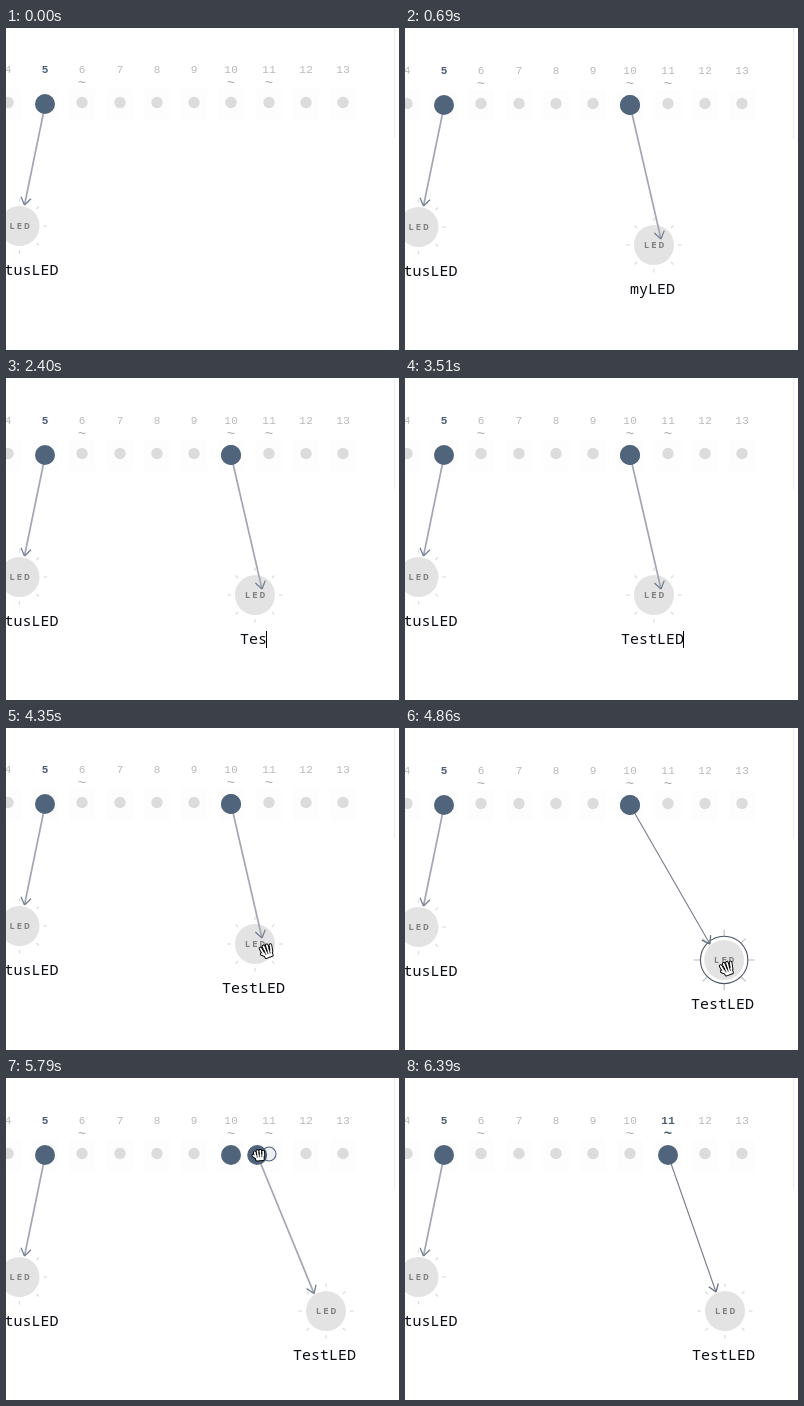
These frames come from a looping animation (393 px wide and 322 px high, 7390 ms). An HTML page with a canvas:

```html
<!DOCTYPE html>
<html lang="en">
<head>
<meta charset="utf-8">
<title>Rewiring an LED</title>
<style>
html, body { margin: 0; width: 100%; height: 100%; overflow: hidden; background: #fff; }
canvas { display: block; width: 393px; height: 322px; }
</style>
</head>
<body>
<canvas id="stage"></canvas>
<script>
const W = 393, H = 322, LOOP = 7390;
const NAVY = '#50647b';
const MONO = '"Noto Sans Mono", "DejaVu Sans Mono", monospace';
const PIN_FONT = '"Liberation Mono", monospace';
const LABEL_FONT = '500 15px ' + MONO;
const LABEL_COLOR = '#0a0d16';
const keyTimes = [1410, 1950, 2400, 2520, 2940, 3060, 3330];

const canvas = document.getElementById('stage');
const ratio = window.devicePixelRatio || 1;
canvas.width = Math.round(W * ratio);
canvas.height = Math.round(H * ratio);
const ctx = canvas.getContext('2d');

const pinX = n => Math.round(39 + (n - 5) * 37.25);
const mix = (a, b, k) => a + (b - a) * k;
const span = (t, from, to) => Math.max(0, Math.min(1, (t - from) / (to - from)));
const ease = (t, from, to) => {
  const k = span(t, from, to);
  return k * k * (3 - 2 * k);
};

function text(str, x, y, font, color, spacing = 0) {
  ctx.font = font;
  ctx.fillStyle = color;
  ctx.letterSpacing = spacing + 'px';
  ctx.textAlign = 'center';
  ctx.fillText(str, x + spacing / 2, y);
}

function disc(x, y, r, fill, stroke) {
  ctx.beginPath();
  ctx.arc(x, y, r, 0, Math.PI * 2);
  ctx.fillStyle = fill;
  ctx.fill();
  if (stroke) {
    ctx.strokeStyle = stroke;
    ctx.lineWidth = 1.1;
    ctx.stroke();
  }
}

function line(x1, y1, x2, y2, color, width) {
  ctx.strokeStyle = color;
  ctx.lineWidth = width;
  ctx.beginPath();
  ctx.moveTo(x1, y1);
  ctx.lineTo(x2, y2);
  ctx.stroke();
}

function pin(n, used) {
  const x = pinX(n);
  const color = used ? '#4a5e76' : '#b9b9b9';
  const weight = used ? 'bold ' : '';
  ctx.fillStyle = '#fdfdfd';
  ctx.fillRect(x - 13, 62, 26, 31);
  text(n, x, 46, weight + '11px ' + PIN_FONT, color, 0.5);
  if (n === 6 || n === 10 || n === 11) {
    text('~', x, 60, weight + '14px ' + PIN_FONT, used ? color : '#a9a9a9');
  }
  if (!used) disc(x, 75.5, 5.7, '#dcdcdc');
}

const plug = x => disc(x, 77, 10, NAVY);

function wire(x, tx, ty, active) {
  const a = Math.atan2(ty - 77, tx - x);
  line(x, 77, tx, ty, active ? '#747c8a' : '#a3a7b3', active ? 1.1 : 1.7);
  for (const s of [-0.6, 0.6]) {
    line(tx, ty, tx - 9 * Math.cos(a + s), ty - 9 * Math.sin(a + s),
      active ? '#66707f' : '#747e90', 1.3);
  }
}

function led(x, y, active) {
  for (let i = 0; i < 8; i++) {
    const c = Math.cos(i * Math.PI / 4), s = Math.sin(i * Math.PI / 4);
    const far = active ? 30.5 : 27.5;
    line(x + c * 24, y + s * 24, x + c * far, y + s * far, active ? '#c6c7ca' : '#dedede', 1.3);
  }
  if (active) disc(x, y, 23.7, '#fff', '#4c5464');
  disc(x, y, 20, '#e3e3e3');
  text('LED', x, y + 3, 'bold 9px ' + MONO, '#808080', 2);
}

function hand(x, y, closed) {
  ctx.save();
  ctx.translate(x, y);
  ctx.rotate(closed ? -0.1 : -0.35);
  ctx.lineCap = ctx.lineJoin = 'round';
  const reach = closed ? 3.5 : 6;
  const fan = closed ? 0.1 : 0.8;
  // Black pass first, then a thinner white pass leaves the outline.
  for (const [color, width] of [['#000', 3.6], ['#fff', 1.7]]) {
    for (let i = 0; i < 4; i++) {
      const fx = (i - 1.5) * 2.7;
      line(fx + (i - 1.5) * fan, Math.abs(i - 1.5) - reach, fx, 2, color, width);
    }
    line(-6, 1, -2, 4.5, color, width);
    ctx.fillStyle = color;
    ctx.beginPath();
    ctx.rect(-2.8, 1.5, 6, 4);
    ctx.fill();
    ctx.stroke();
  }
  for (let i = -1; i <= 1; i++) line(i * 2.6, -1.5, i * 2.3, 3, '#000', 0.7);
  ctx.restore();
}

function label(x, y, t) {
  const typed = keyTimes.filter(k => t >= k).length;
  const name = typed ? 'TestLED'.slice(0, typed) : 'myLED';
  const half = name.length * 4.5;
  if (!typed && t >= 780) {
    ctx.fillStyle = '#b6d0f7';
    ctx.fillRect(Math.round(x - half), y - 13, half * 2, 17);
  }
  text(name, x, y, LABEL_FONT, LABEL_COLOR);
  if (typed && t - keyTimes[typed - 1] < 500) {
    ctx.fillStyle = '#000';
    ctx.fillRect(Math.floor(x + half - 0.6), y - 13, 1, 17);
  }
}

function draw(t) {
  const raised = t < 600 || (t >= 4110 && t < 4500);
  const moving = t >= 5640 && t < 5880;
  const dropped = t >= 5880;
  const lifted = t >= 4400 && t < 4980;

  const drag = ease(t, 4440, 4890);
  const rewire = ease(t, 5640, 5880);
  const ledX = mix(249, 320, drag);
  const ledY = mix(217, 233, span(t, 4440, 4890));
  const tipX = ledX + mix(mix(7, -14.5, drag), -9, rewire ** 2);
  const tipY = ledY + mix(mix(-6, -16, drag), -19, rewire ** 2);
  const plugX = mix(pinX(10), pinX(11), rewire);

  ctx.setTransform(ratio, 0, 0, ratio, 0, 0);
  ctx.fillStyle = '#fff';
  ctx.fillRect(0, 0, W, H);
  ctx.translate(0, raised ? -1 : 0);

  ctx.fillStyle = '#ececec';
  ctx.fillRect(388, -1, 1, 112);
  for (let n = 4; n <= 13; n++) pin(n, n === 5 || (n === 11 && dropped));

  led(13.5, 199, false);
  text('statusLED', 12, 248, LABEL_FONT, LABEL_COLOR);
  wire(39.3, 18.5, 178, false);
  plug(pinX(5));

  ctx.globalAlpha = span(t, 30, 420);
  led(ledX, ledY, lifted);
  label(ledX - 1.6, ledY + 49, t);
  wire(plugX, tipX, tipY, lifted || dropped);
  if (!dropped) plug(pinX(10));
  if (moving) disc(pinX(11), 76, 7, '#eef0f4', NAVY);
  plug(plugX);
  ctx.globalAlpha = 1;

  if (t >= 4200 && t < 6390) {
    const enter = 1 - ease(t, 4200, 4350);
    const grab = ease(t, 4350, 4440);
    const travel = ease(t, 4950, 5250);
    const leave = ease(t, 5940, 6360);
    const x = mix(ledX + mix(12, 3, grab) + 14 * enter, plugX + 2, travel);
    const y = mix(ledY + mix(7, 8.5, grab) + 38 * enter, 76, travel) - 60 * leave;
    hand(x, y, (t >= 4440 && t < 4830) || (t >= 5430 && !dropped));
  }
}

const start = performance.now();
function tick() {
  draw((performance.now() - start) % LOOP);
  requestAnimationFrame(tick);
}
tick();
</script>
</body>
</html>
```
